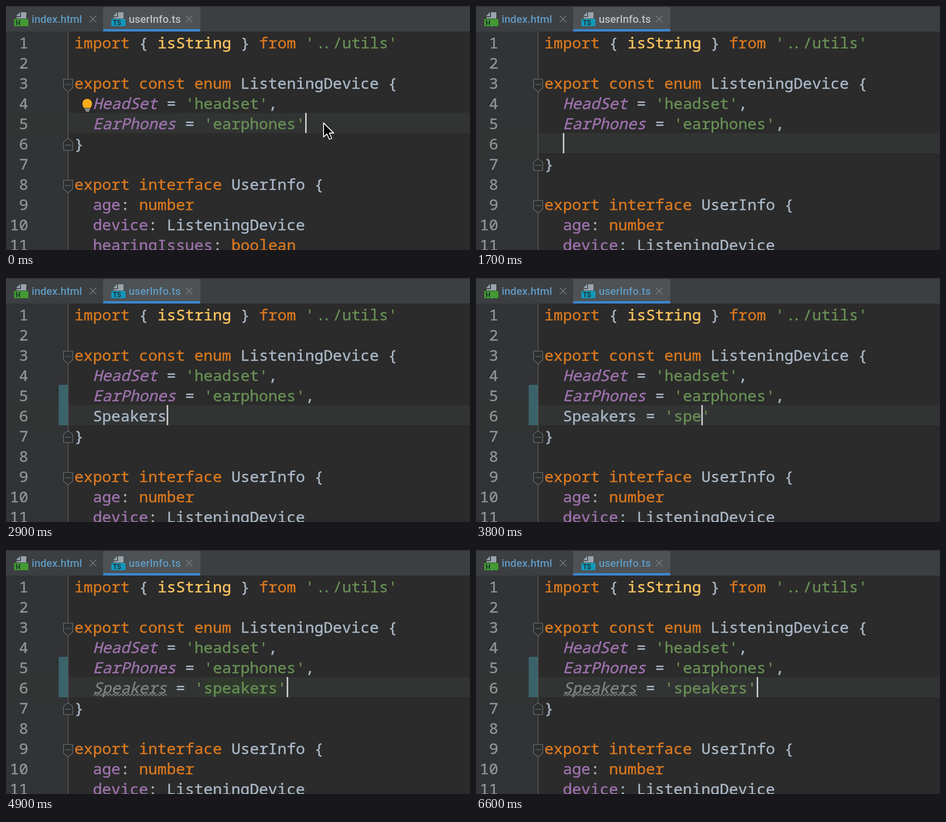
Recreate the animation shown at these times as an HTML page. Size 960 px wide and 507 px high, loop 6700 ms.

```html
<!DOCTYPE html>
<html lang="en">
<head>
<meta charset="utf-8">
<title>Editor typing</title>
<style>
html, body { margin: 0; width: 100%; height: 100%; overflow: hidden; background: #2b2b2b; }
svg { display: block; width: 960px; height: 507px; }
text { white-space: pre; }
.mono text {
  font: 500 31.8px "Noto Sans Mono", "DejaVu Sans Mono", monospace;
  fill: currentColor; stroke: currentColor; stroke-width: 0.5;
}
.tab { font: 500 22.2px Roboto, Inter, sans-serif; }
.badge { font: bold 14px Roboto, Inter, sans-serif; fill: #203432; }
.plain { color: #a9b7c6; }
.keyword { color: #d8781f; }
.call { color: #ffc560; }
.string { color: #678f55; }
.field { color: #9d72ac; }
.mono .member { color: #9d72ac; font-style: italic; }
.mono .unused { color: #7f8182; font-style: italic; }
.number { color: #909497; text-anchor: end; }
.fold { fill: #2d2e2f; stroke: #636668; stroke-width: 1.6; }
</style>
</head>
<body>
<svg viewBox="0 0 960 507">
  <rect width="960" height="507" fill="#2b2b2b"/>
  <rect width="128" height="507" fill="#313335"/>
  <rect id="caretRow" width="960" height="42" fill="#323434"/>
  <rect id="changeBar" x="109" y="222" width="19" height="84" fill="#3b636b"/>
  <path d="M128.5 53V507" stroke="#58595a" stroke-width="1.6"/>
  <g id="folds"></g>
  <rect id="wordMark" x="411" y="267" width="154" height="37" fill="#2f3a2d"/>
  <g id="code" class="mono"></g>
  <path id="wave" fill="none" stroke="#858780" stroke-width="1.4"/>
  <g id="bulb">
    <path d="M162 212C155 205 158 193 168 193S181 205 174 212Z" fill="#fbad1d"/>
    <path d="M163 214.5H174M165 218H172" stroke="#a9adb0" stroke-width="2.4"/>
  </g>
  <rect id="caret" width="3" height="42" fill="#d0d2d3"/>
  <path id="pointer" d="M657 243V272L664 266L669 277L674 275L669 264H678Z" fill="#000" stroke="#fff" stroke-width="1.8" stroke-linejoin="round"/>

  <rect width="960" height="53" fill="#3c3f41"/>
  <rect x="201" width="201" height="53" fill="#4e5254"/>
  <rect width="960" height="2" fill="#333638"/>
  <rect x="201" y="48" width="201" height="5" fill="#3b87cc"/>
  <g id="tabIcons"></g>
  <text class="tab" x="53" y="35" fill="#5f99c2">index.html</text>
  <text class="tab" x="254" y="35" id="activeName">userInfo.ts</text>
  <path d="M173 20l14 14m0-14l-14 14M372 20l14 14m0-14l-14 14" stroke="#797c7e" stroke-width="1.7"/>
</svg>
<script>
const LOOP = 6700, LEFT = 141.5, ADVANCE = 19.1, TOP = 54, ROW = 42, BASE = 34;
const COMMA = 1000, ENTER = 1600, BAR = 1800, INSPECT = 4600, MARK_END = 5400;
const $ = id => document.getElementById(id);
const rowY = row => TOP + (row - 1) * ROW;
const colX = col => LEFT + col * ADVANCE;

const line = (...parts) => parts.map(part => {
  const [kind, text] = part.split('~');
  return text === undefined ? ['plain', kind] : [kind, text];
});
const before = [
  line('keyword~import', ' { ', 'call~isString', ' } ', 'keyword~from', ' ', "string~'../utils'"),
  [],
  line('keyword~export const enum', ' ListeningDevice {'),
  line('  ', 'member~HeadSet', ' = ', "string~'headset'", ','),
  line('  ', 'member~EarPhones', ' = ', "string~'earphones'")
];
const after = [
  line('}'),
  [],
  line('keyword~export interface', ' UserInfo {'),
  line('  ', 'field~age', ': ', 'keyword~number'),
  line('  ', 'field~device', ': ListeningDevice'),
  line('  ', 'field~hearingIssues', ': ', 'keyword~boolean')
];

// The moment each character of the new line is typed.
const typed = "Speakers = 'speakers'";
const keyTimes = [
  2000, 2200, 2300, 2400, 2500, 2600, 2700, 2800,
  3000, 3100, 3200, 3400, 3500, 3600, 3700, 3900,
  4000, 4100, 4200, 4300, 4400
];

function textAt(x, y, kind, text) {
  return `<text x="${x}" y="${y}" class="${kind}">${text}</text>`;
}

function drawLine(parts, row) {
  let col = 0, out = '';
  for (const [kind, text] of parts) {
    const y = rowY(row) + BASE;
    const dots = text.indexOf('..');
    if (dots < 0) {
      out += textAt(colX(col), y, kind, text);
    } else {
      // The two dots sit closer together than their cells.
      const at = col + dots;
      out += textAt(colX(col), y, kind, text.slice(0, dots))
        + textAt(colX(at) + 3.5, y, kind, '.')
        + textAt(colX(at + 1) - 3.5, y, kind, '.')
        + textAt(colX(at + 2), y, kind, text.slice(dots + 2));
    }
    col += text.length;
  }
  return out;
}

function newLine(count, inspected) {
  const parts = line('  ', (inspected ? 'unused~' : 'plain~') + typed.slice(0, Math.min(count, 8)));
  if (count > 8) parts.push(['plain', typed.slice(8, Math.min(count, 11))]);
  if (count > 11) {
    const open = typed.slice(11, count);
    parts.push(['string', count < typed.length ? open + "'" : open]);
  }
  return parts;
}

function foldMark(row, closing) {
  const y = rowY(row);
  const shape = closing
    ? `M119 ${y + 36}V${y + 19}L128.5 ${y + 11}L138 ${y + 19}V${y + 36}Z`
    : `M119 ${y + 14}H138V${y + 32}L128.5 ${y + 40}L119 ${y + 32}Z`;
  return `<path class="fold" d="${shape}M122.5 ${y + 25}H134.5"/>`;
}

function fileIcon(x, color, label) {
  return `<path d="M${x + 14} 13H${x + 25}V26H${x + 5}V23H${x + 14}ZM${x + 12} 13V21H${x + 4}Z" fill="#9aa5ad"/>
    <rect x="${x}" y="27" width="29" height="15" fill="${color}"/>
    <text class="badge" x="${x + 3}" y="40">${label}</text>`;
}

const numbers = Array.from({ length: 11 }, (_, i) =>
  textAt(46, rowY(i + 1) + BASE, 'number', i + 1)).join('');
$('tabIcons').innerHTML = fileIcon(17, '#429a32', 'H') + fileIcon(218, '#1199bd', 'TS');
$('wave').setAttribute('d', 'M181 303' + 'l3.8 -4l3.8 4'.repeat(20));

const show = (id, on) => $(id).setAttribute('visibility', on ? 'visible' : 'hidden');
function place(id, attrs) {
  for (const name in attrs) $(id).setAttribute(name, attrs[name]);
}

let lastState = '';
function render(t) {
  const comma = t >= COMMA, entered = t >= ENTER, changed = t >= BAR;
  const inspected = t >= INSPECT, marked = inspected && t < MARK_END;
  const count = keyTimes.filter(time => time <= t).length;
  const state = [comma, entered, changed, inspected, marked, count].join();
  if (state === lastState) return;
  lastState = state;

  const rows = before.slice();
  if (comma) rows[4] = [...rows[4], ['plain', ',']];
  if (entered) rows.push(newLine(count, inspected));
  rows.push(...after);
  $('code').innerHTML = numbers + rows.slice(0, 11).map((parts, i) => drawLine(parts, i + 1)).join('');

  const shift = entered ? 1 : 0, caretY = rowY(5 + shift);
  $('folds').innerHTML = foldMark(3) + foldMark(6 + shift, true) + foldMark(8 + shift);
  place('caretRow', { y: caretY });
  place('caret', { x: colX(entered ? 2 + count : comma ? 26 : 25), y: caretY });
  place('activeName', { fill: changed ? '#5f99c2' : '#bec1c3' });
  show('changeBar', changed);
  show('wave', inspected);
  show('wordMark', marked);
  show('bulb', !comma);
  show('pointer', !comma);
}

const start = performance.now();
function tick() {
  render((performance.now() - start) % LOOP);
  requestAnimationFrame(tick);
}
tick();
</script>
</body>
</html>
```
